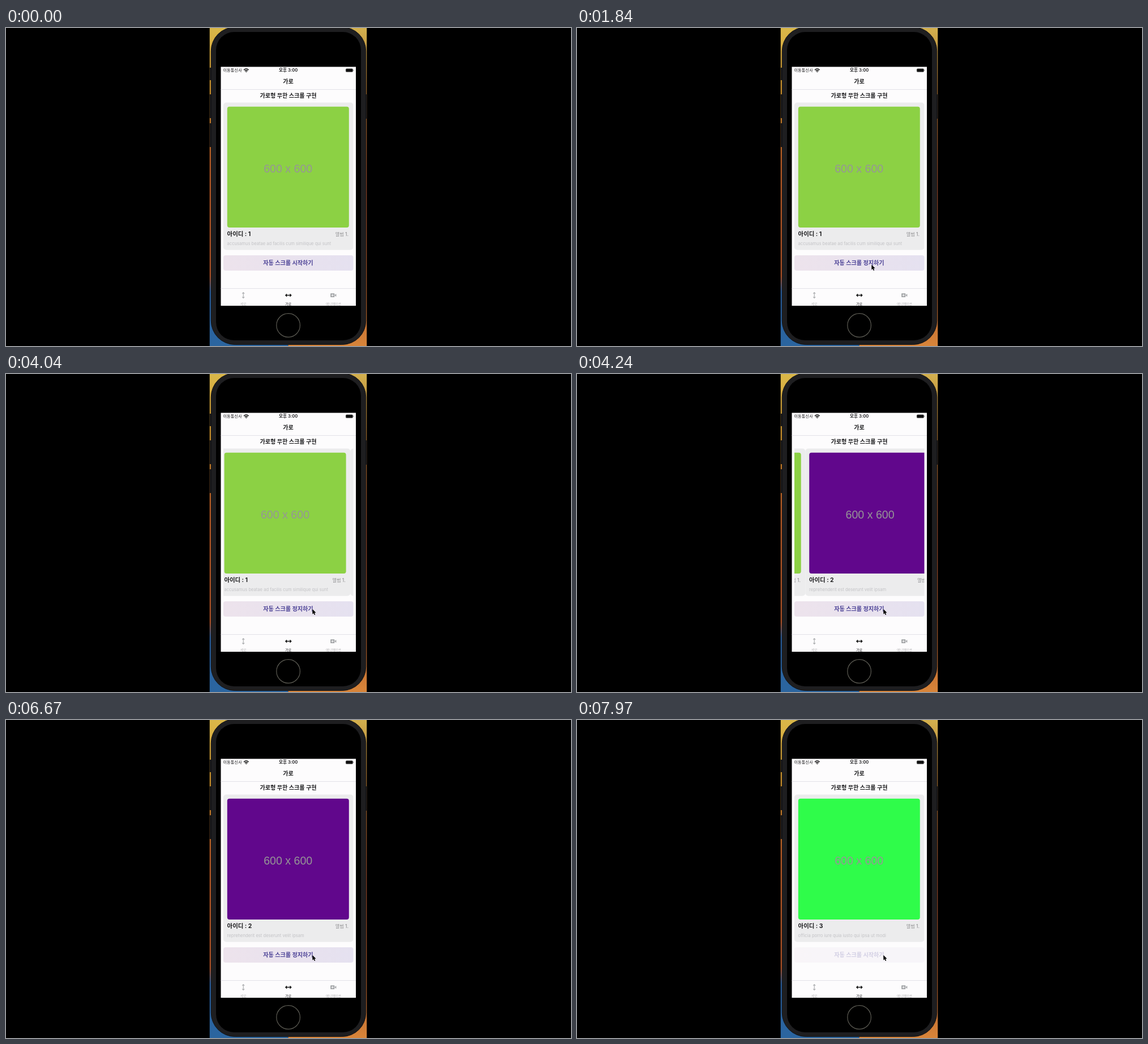
Animation of 998 by 561 pixels, one loop 8000 ms. Source, as an HTML page:

```html
<!DOCTYPE html>
<html lang="ko">
<head>
<meta charset="utf-8">
<title>가로형 무한 스크롤</title>
<style>
html, body { margin: 0; width: 100%; height: 100%; overflow: hidden; background: #000; }
svg { display: block; width: 100vw; height: 100vh; }
text { font-family: Inter, "Noto Sans CJK KR", "Noto Sans CJK JP", "Noto Sans CJK", sans-serif; fill: #1b1b1d; }
.mid { text-anchor: middle; }
.end { text-anchor: end; }
.bold { font-weight: 700; }
.size { font: 19.6px "Liberation Sans", Arial, sans-serif; fill: #969696; }
.tab { font-size: 5.8px; fill: #b4b4b6; }
</style>
</head>
<body>
<svg viewBox="0 0 998 561">
  <defs>
    <linearGradient id="left" x2="0" y2="1">
      <stop offset="0" stop-color="#d9b749"/>
      <stop offset=".2" stop-color="#d99a2e"/>
      <stop offset=".42" stop-color="#c8642a"/>
      <stop offset=".78" stop-color="#b9582a"/>
      <stop offset=".83" stop-color="#2a62a4"/>
      <stop offset="1" stop-color="#2b659f"/>
    </linearGradient>
    <linearGradient id="right" x2="0" y2="1">
      <stop offset="0" stop-color="#d3b04e"/>
      <stop offset=".2" stop-color="#a8702f"/>
      <stop offset=".5" stop-color="#96482a"/>
      <stop offset=".85" stop-color="#b4602c"/>
      <stop offset="1" stop-color="#d8853a"/>
    </linearGradient>
    <linearGradient id="btn">
      <stop offset="0" stop-color="#ede3ec"/>
      <stop offset="1" stop-color="#e5e1f0"/>
    </linearGradient>
    <clipPath id="strip"><rect x="359.5" width="278" height="561"/></clipPath>
    <clipPath id="screen"><rect x="379.5" y="68.5" width="238.5" height="421.5"/></clipPath>
    <clipPath id="view"><rect x="384" y="131" width="229.5" height="261"/></clipPath>
  </defs>
  <rect width="998" height="561"/>

  <g clip-path="url(#strip)">
    <rect x="359.5" width="139" height="561" fill="url(#left)"/>
    <rect x="498.5" width="139" height="561" fill="url(#right)"/>
    <path d="M360 70h4v22h-4zM360 117h4v42h-4zM360 168h4v42h-4zM634 117h3.5v43h-3.5z" fill="#1a1a1c"/>
    <rect x="362.3" y="-1.5" width="273.4" height="560" rx="42" fill="#1e1e20" stroke="#111113"/>
    <rect x="371" y="7" width="256" height="544" rx="32"/>
    <circle cx="498.6" cy="524.5" r="20.8" fill="none" stroke="#5d5c54" stroke-width="1.2"/>

    <g clip-path="url(#screen)">
      <rect x="379" y="68" width="240" height="423" fill="#fdfcfd"/>
      <text x="383.5" y="77.3" font-size="7.2">이동통신사</text>
      <g fill="none" stroke="#111" stroke-width="1.5">
        <path d="M420 74q4.3-4 8.6 0M421.8 75.9q2.5-2.3 5 0"/>
        <circle cx="424.3" cy="77.2" r=".6" stroke-width="1"/>
      </g>
      <text class="mid" x="498.6" y="77.4" font-size="7.6" font-weight="600">오후 3:00</text>
      <rect x="600.2" y="71.8" width="12.4" height="5.8" rx="1.5" fill="#111" stroke="#777" stroke-width=".5"/>
      <path d="M613.4 73.5v2.3" stroke="#777" stroke-width=".9"/>
      <text class="mid" x="498.5" y="98.4" font-size="10.05" font-weight="600">가로</text>
      <path d="M379 108.5h240M379 459.5h240" stroke="#e3e2e8"/>
      <text class="mid bold" x="498.5" y="123.4" font-size="10.1">가로형 무한 스크롤 구현</text>

      <g clip-path="url(#view)"><g id="list"></g></g>

      <g id="button">
        <rect x="384" y="401" width="229.5" height="27" rx="4" fill="url(#btn)"/>
        <text id="label" class="mid bold" x="498.4" y="418" font-size="10.1" style="fill:#4c4296"></text>
      </g>

      <g fill="none" stroke="#a9abad" stroke-width="1.1">
        <path d="M419.2 466.8v9.4M417.2 468.6l2-2 2 2M417.2 474.4l2 2 2-2"/>
        <path d="M494 471.5h9.6M496.2 469.2l-2.3 2.3 2.3 2.3M501.4 469.2l2.3 2.3-2.3 2.3" stroke="#111" stroke-width="1.4"/>
      </g>
      <rect x="573" y="468" width="7.4" height="7" rx="1.2" fill="#a9abad"/>
      <path d="M580.8 470.8l2.6-1.8v5l-2.6-1.8z" fill="#a9abad"/>
      <path d="M576.7 469.6v3.8M574.8 471.5h3.8" stroke="#fdfcfd" stroke-width="1"/>
      <text class="tab mid" x="419.2" y="489.2">세로</text>
      <text class="tab mid" x="498.7" y="489.2" style="fill:#1b1b1d">가로</text>
      <text class="tab mid" x="578.4" y="489.2">애니메이션</text>
    </g>

    <path id="cursor" d="M0 0v9l2-1.8 1.4 3.2 1.6-.7-1.4-3.1h2.7z" stroke="#fff" stroke-width=".7" paint-order="stroke"/>
  </g>
</svg>
<script>
const LOOP = 8000, PITCH = 229.5, SLIDE = 290;
const $ = id => document.getElementById(id);
const clamp = v => Math.min(1, Math.max(0, v));

const cards = [
  ["#8cd144", "accusamus beatae ad facilis cum similique qui sunt"],
  ["#61078c", "reprehenderit est deserunt velit ipsam"],
  ["#2ffc4a", "officia porro iure quia iusto qui ipsa ut modi"]
];
$("list").innerHTML = cards.map(([color, note], i) => `
  <g transform="translate(${i * PITCH})">
    <rect x="384" y="131.5" width="${PITCH}" height="260" rx="5" fill="#ececed"/>
    <rect x="390.8" y="138.8" width="215" height="213.2" rx="4" fill="${color}"/>
    <text class="size mid" x="498.2" y="254.6">600 x 600</text>
    <text class="bold" x="390.6" y="367.2" font-size="10.4">아이디 : ${i + 1}</text>
    <text class="end" x="605" y="367" font-size="8.3" font-weight="500" style="fill:#929294">앨범 1.</text>
    <text x="390.6" y="382.6" font-size="7.6" style="fill:#c3c3c6">${note}</text>
  </g>`).join("");

// Standard ease-in-out: cubic-bezier(.42, 0, .58, 1)
function ease(x) {
  let lo = 0, hi = 1, s = x;
  for (let i = 0; i < 20; i++) {
    s = (lo + hi) / 2;
    const bx = 3 * s * (1 - s) * (1 - s) * .42 + 3 * s * s * (1 - s) * .58 + s ** 3;
    if (bx < x) lo = s; else hi = s;
  }
  return s * s * (3 - 2 * s);
}
const quad = p => p < .5 ? 2 * p * p : 1 - 2 * (1 - p) ** 2;

const slides = [4010, 7328];
const taps = [{ down: 890, up: 1060 }, { down: 7785, up: 7932 }];

// time, x, y
const path = [
  [30, 640, 462], [420, 560, 432], [830, 516.5, 419.5], [1470, 516.5, 419.5],
  [1840, 520.3, 417.5], [2270, 530, 416], [2500, 530, 416],
  [3100, 538, 415], [3240, 538, 415], [3470, 541.3, 414.7]
];

function pointer(t) {
  let i = path.findIndex(k => k[0] > t);
  if (i < 0) return path[path.length - 1].slice(1);
  if (i === 0) return path[0].slice(1);
  const [t0, x0, y0] = path[i - 1], [t1, x1, y1] = path[i];
  const p = (t - t0) / (t1 - t0);
  return [x0 + (x1 - x0) * p, y0 + (y1 - y0) * p];
}

function fade(t) {
  const tap = taps.filter(k => t >= k.down).pop();
  if (!tap) return 1;
  const pressed = 1 - .8 * quad(clamp((Math.min(t, tap.up) - tap.down) / 150));
  return pressed + (1 - pressed) * quad(clamp((t - tap.up) / 250));
}

function draw(t) {
  const shift = slides.reduce((sum, s) => sum + ease(clamp((t - s) / SLIDE)), 0) * PITCH;
  $("list").setAttribute("transform", `translate(${-shift})`);
  $("button").setAttribute("opacity", fade(t));
  const running = t >= taps[0].up && t < taps[1].up;
  $("label").textContent = `자동 스크롤 ${running ? "정지" : "시작"}하기`;
  $("cursor").setAttribute("transform", `translate(${pointer(t)})`);
}

const start = performance.now();
function tick() {
  draw((performance.now() - start) % LOOP);
  requestAnimationFrame(tick);
}
draw(0);
requestAnimationFrame(tick);
</script>
</body>
</html>
```
